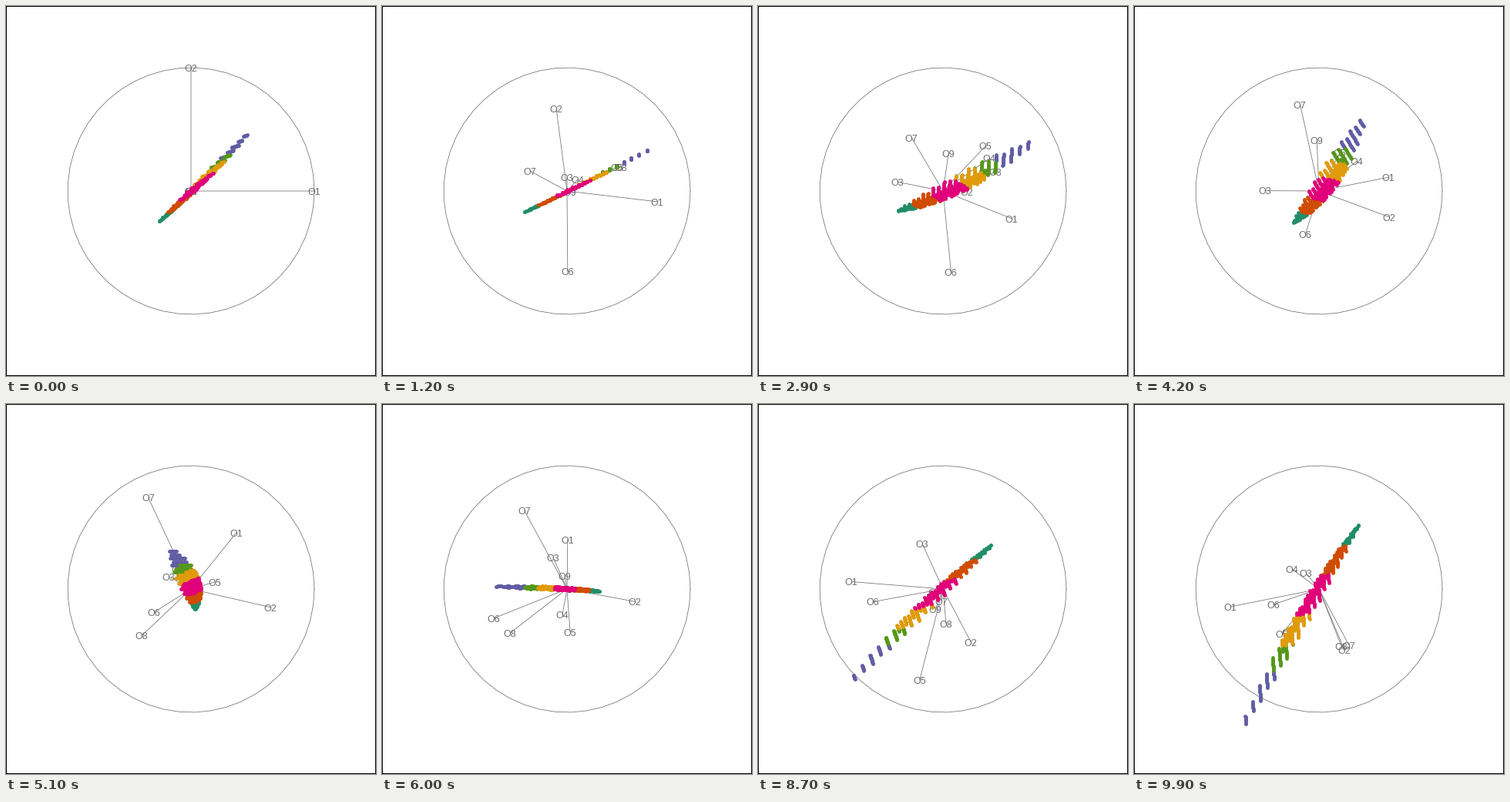
A matplotlib script for the animation above (10000 ms loop, 480x480 px).

```python
import math

import matplotlib.pyplot as plt
import numpy as np
from matplotlib.animation import FuncAnimation
from matplotlib.patches import Rectangle

SIZE, DPI, RADIUS = 480, 100, 160
FRAMES, INTERVAL = 100, 100
PX = 72 / DPI
GREY = "#6c6c6c"
COLORS = ["#218d66", "#d04c00", "#e00079", "#e09b0c", "#55971a", "#625da4"]
LIMITS = [-0.325, -0.11, 0.19, 0.43, 0.63]
DRAW_ORDER = [5, 4, 3, 0, 1, 2]


def pose(x, y):
    """Nearest orthonormal 9x2 basis to the axis tips given in pixels."""
    u, _, vt = np.linalg.svd(np.array([x, y], float).T, full_matrices=False)
    return u @ vt


def geodesic(a, z, t):
    """Plane on the geodesic from a (t=0) to z (t=1); t may go past 1."""
    u, s, vt = np.linalg.svd(a.T @ z)
    s = np.clip(s, 0, 1)
    angle = np.arccos(s)
    start = a @ u
    side = (z @ vt.T - start * s) / np.maximum(np.sin(angle), 1e-6)
    q = u @ vt
    spin = t * math.atan2(q[1, 0], q[0, 0])
    turn = np.array([[math.cos(spin), -math.sin(spin)],
                     [math.sin(spin), math.cos(spin)]])
    plane = start * np.cos(t * angle) + side * np.sin(t * angle)
    return plane @ u.T @ turn


def plan_tour():
    """Stops (frame, basis); between two stops the plane turns evenly."""
    start = np.eye(9, 2)
    early = pose([117, -14, 0, 14, 65, 1, -48, 70, 4],
                 [-14, 106, 18, 15, 31, -104, 26, 31, -1])
    second = pose([89, 31, -59, 60, 55, 11, -41, 68, 7],
                  [-36, -1, 12, 42, 58, -105, 69, 24, 49])
    fourth = pose([1, 88, -18, -6, 4, -95, -55, -74, -3],
                  [64, -16, 41, -33, -56, -38, 101, -57, 17])
    fifth = pose([-96, 23, -20, 12, -30, -109, -41, -27, 21],
                 [16, -20, 64, -36, -128, -20, 51, 8, 13])
    last = pose([-115, 33, -17, -35, -48, -59, 39, 29, -40],
                [-23, -79, 21, 26, -58, -20, -73, -74, -56])
    # Each leg runs straight on through its pose up to the turning point.
    turn1 = geodesic(start, early, 18 / 12)
    turn2 = geodesic(turn1, second, 17 / 10)
    turn4 = geodesic(fourth, fifth, 0.95)
    turn3 = geodesic(turn4, fourth, 20 / 13)
    return [(0, start), (18, turn1), (19, turn1), (36, turn2), (53, turn3),
            (73, turn4), (74, turn4), (75, fifth), (99, last)]


def make_data():
    """Wedge of short strokes in nine dimensions, grouped along its length."""
    along = np.linspace(0.44, 0.51, 9)
    along[7] = 0.6
    across = 0.1 * np.linspace(-0.65, 1, 9) ** 3
    points, group = [], []
    for half in range(44):
        is_half = half % 2 == 1
        if is_half and half < 10:
            continue
        u = 1 - 2.86 * (1 - 0.965 ** (half / 2))
        full = max(0, 4.6 * (1.15 - u) * (u + 0.55))
        length = full * (0.5 if is_half else 1 if half % 4 == 0 else 0.75)
        middle = u * (u - 1) - (full - length) / 2 * is_half
        for v in middle + np.linspace(-0.5, 0.5, int(length / 0.15) + 2) * length:
            points.append(u * along + v * across)
            group.append(np.searchsorted(LIMITS, u + 0.063 * v))
    return np.array(points), np.array(group)


TOUR = plan_tour()
points, group = make_data()


def basis_at(frame):
    for (t0, a), (t1, z) in zip(TOUR, TOUR[1:]):
        if frame <= t1:
            return geodesic(a, z, (frame - t0) / (t1 - t0))


fig = plt.figure(figsize=(SIZE / DPI, SIZE / DPI), dpi=DPI, facecolor="white")
ax = fig.add_axes([0, 0, 1, 1])
ax.set_xlim(-SIZE / 2, SIZE / 2)
ax.set_ylim(-SIZE / 2, SIZE / 2)
ax.axis("off")

edge = SIZE / 2 - 0.5
ax.add_patch(Rectangle((-edge, -edge), 2 * edge, 2 * edge, fill=False,
                       edgecolor="black", linewidth=PX, snap=False))
thin = dict(color=GREY, linewidth=0.75 * PX, snap=False, zorder=1)
theta = np.linspace(0, 2 * math.pi, 50)
ax.plot(RADIUS * np.cos(theta), RADIUS * np.sin(theta), **thin)

spokes = [ax.plot([], [], **thin)[0] for _ in range(9)]
labels = [ax.text(0, 0, f"O{i + 1}", color=GREY, family="Liberation Sans",
                  fontsize=12.5 * PX, ha="center", va="baseline", zorder=2)
          for i in range(9)]
clouds = {g: ax.plot([], [], "o", color=COLORS[g], markersize=4.8 * PX,
                     markeredgewidth=0, zorder=3 + n)[0]
          for n, g in enumerate(DRAW_ORDER)}


def draw(frame):
    plane = basis_at(frame) * RADIUS
    for (x, y), spoke, label in zip(plane, spokes, labels):
        spoke.set_data([0, x], [0, y])
        label.set_position((x - 0.4, y - 4.8))
    places = points @ plane
    for g, cloud in clouds.items():
        cloud.set_data(*places[group == g].T)
    return [*spokes, *labels, *clouds.values()]


anim = FuncAnimation(fig, draw, frames=FRAMES, interval=INTERVAL,
                     repeat=True, repeat_delay=0, blit=False)
plt.show()
```
